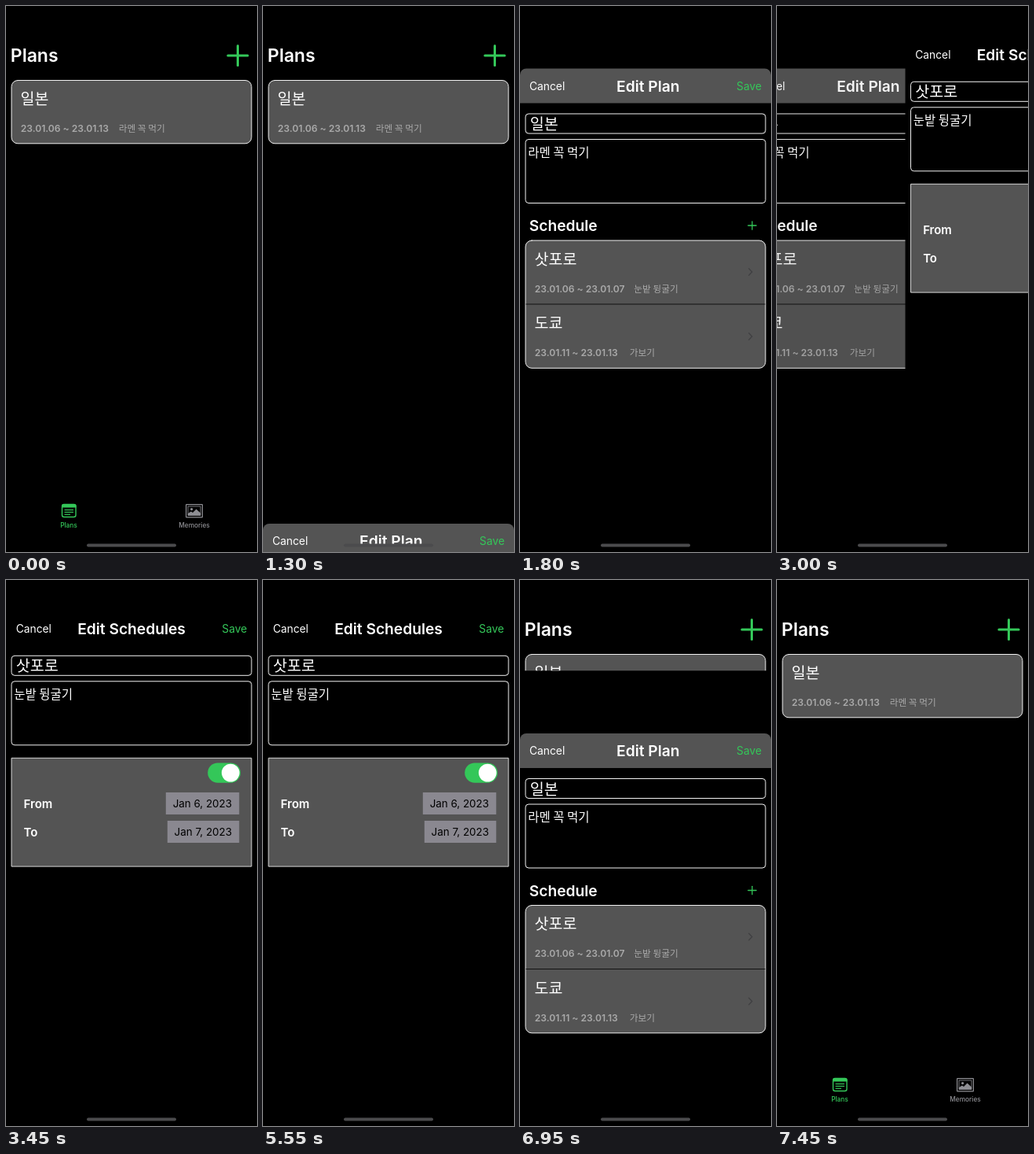
Write an HTML page with a canvas that moves like this. It is 320x694 px and loops after 8000 ms.

```html
<!DOCTYPE html>
<html lang="ko">
<head>
<meta charset="utf-8">
<title>Travel plans</title>
<style>
  html, body { margin: 0; width: 100%; height: 100%; overflow: hidden; background: #000; }
  canvas { display: block; width: 320px; height: 694px; }
</style>
</head>
<body>
<canvas id="stage"></canvas>
<script>
const W = 320, H = 694, LOOP = 8000, STEP = 50;
const GREEN = '#34c759', CARD = '#545454', SOFT = '#a9a9a9', GRAY = '#8e8e93', EDGE = '#f2f2f2';
const LATIN = 'Inter, "Noto Sans CJK KR", sans-serif';
const HANGUL = '"Noto Sans CJK KR", "Noto Sans CJK", sans-serif';

const canvas = document.getElementById('stage');
const ctx = canvas.getContext('2d');
const dpr = window.devicePixelRatio || 1;
canvas.width = W * dpr;
canvas.height = H * dpr;

function text(str, x, y, size, weight = 400, color = '#fff', align = 'left', family = LATIN) {
  ctx.font = `${weight} ${size}px ${family}`;
  ctx.fillStyle = color;
  ctx.textAlign = align;
  ctx.fillText(str, x, y);
}

function hangul(str, x, y, size, color = '#fff') {
  text(str, x, y, size, 500, color, 'left', HANGUL);
}

function box(x, y, w, h, r, fill, stroke, line = 1) {
  ctx.beginPath();
  ctx.roundRect(x, y, w, h, r);
  if (fill) {
    ctx.fillStyle = fill;
    ctx.fill();
  }
  if (stroke) {
    ctx.strokeStyle = stroke;
    ctx.lineWidth = line;
    ctx.stroke();
  }
}

function path(points, color, width, cap = 'butt') {
  ctx.beginPath();
  points.forEach(([x, y], i) => i ? ctx.lineTo(x, y) : ctx.moveTo(x, y));
  ctx.strokeStyle = color;
  ctx.lineWidth = width;
  ctx.lineCap = cap;
  ctx.stroke();
}

function plus(x, y, r, width) {
  path([[x - r, y], [x + r, y]], GREEN, width, 'round');
  path([[x, y - r], [x, y + r]], GREEN, width, 'round');
}

function disc(x, y, r, color) {
  ctx.beginPath();
  ctx.arc(x, y, r, 0, Math.PI * 2);
  ctx.fillStyle = color;
  ctx.fill();
}

function page(x, y, draw) {
  ctx.save();
  ctx.translate(x, y);
  ctx.fillStyle = '#000';
  ctx.fillRect(0, 0, W, H);
  draw();
  ctx.restore();
}

// Title, dates and note of one card row
function entry(y, title, dates, note, noteX) {
  hangul(title, 18.5, y + 31.3, 19.5);
  text(dates, 18.7, y + 66.2, 12.1, 600, SOFT);
  hangul(note, noteX, y + 66.2, 11.7, SOFT);
}

function fields(y, title, note) {
  box(7, y, 306, 25, 4, '#000', EDGE);
  box(7, y + 32.5, 306, 81, 4, '#000', EDGE);
  hangul(title, 12.7, y + 20, 19.6);
  hangul(note, 10.2, y + 54.8, 15.5);
}

function header(title, titleX, y, left, right) {
  text('Cancel', left, y - 2, 13.8);
  text(title, titleX, y, 19.2, 600, '#fff', 'center');
  text('Save', right, y - 2, 13.8, 400, GREEN, 'right');
}

function listIcon() {
  box(71.5, 633.5, 17.5, 16, 2.5, null, GREEN, 1.4);
  box(71, 633, 18.5, 4.5, [2.5, 2.5, 0, 0], GREEN);
  for (const [y, end] of [[640.5, 86], [643.4, 86], [646.3, 82]])
    path([[74.5, y], [end, y]], GREEN, 1.2);
}

function photoIcon() {
  box(229.6, 633.6, 20.8, 16.3, 0.5, null, GRAY, 1.2);
  box(232, 636, 16, 11.5, 0, null, GRAY, 0.8);
  disc(236.6, 639.6, 1.6, GRAY);
  ctx.beginPath();
  [[232, 647.5], [232, 645], [236, 642.5], [238, 644], [242.5, 639.5], [248, 644.5], [248, 647.5]]
    .forEach(([x, y]) => ctx.lineTo(x, y));
  ctx.fill();
}

function plansPage() {
  text('Plans', 5.8, 71.4, 23, 600);
  plus(295.5, 63, 12.6, 3);
  box(7, 94.5, 306, 80.3, 8, CARD, EDGE);
  entry(94, '일본', '23.01.06 ~ 23.01.13', '라멘 꼭 먹기', 143.7);
  listIcon();
  photoIcon();
  text('Plans', 80, 663, 8.3, 500, GREEN, 'center');
  text('Memories', 240, 663, 8.3, 500, GRAY, 'center');
}

function planPage() {
  box(0, 79.5, W, 44, [8, 8, 0, 0], CARD);
  header('Edit Plan', 163.3, 108.8, 12, 308);
  fields(137, '일본', '라멘 꼭 먹기');
  text('Schedule', 11.8, 286, 19.2, 600);
  plus(296, 279, 5.2, 1.3);
  box(7, 298, 306, 162.3, 8, CARD, EDGE);
  path([[7.5, 379], [312.5, 379]], '#111', 1);
  entry(297.5, '삿포로', '23.01.06 ~ 23.01.07', '눈밭 뒹굴기', 145.3);
  entry(379, '도쿄', '23.01.11 ~ 23.01.13', '가보기', 139.7);
  for (const y of [338, 420])
    path([[291.8, y - 4.2], [295.8, y], [291.8, y + 4.2]], '#404042', 1.3, 'round');
}

function dateRow(y, label, date, x) {
  text(label, 22.6, y + 19.6, 15, 600);
  box(x, y, 297.3 - x, 28, 0, '#8a8890');
  text(date, 288, y + 19, 13.4, 400, '#000', 'right');
}

function schedulePage() {
  header('Edit Schedules', 160, 68.8, 12.7, 307.3);
  fields(96.3, '삿포로', '눈밭 뒹굴기');
  box(7, 226.3, 306, 137.8, 0, CARD, '#d8d8d8');
  box(257.2, 232.4, 41.8, 25.4, 12.7, GREEN);
  disc(286.3, 245.1, 11.4, '#fff');
  dateRow(270, 'From', 'Jan 6, 2023', 203.8);
  dateRow(306, 'To', 'Jan 7, 2023', 205.8);
}

// Critically damped spring from 0 to 1
function spring(t, start) {
  const x = Math.max(0, t - start) * 0.01826;
  return x > 9.5 ? 1 : 1 - (1 + x) * Math.exp(-x);
}

function render(t) {
  const cover = spring(t, 1260) - spring(t, 6910);
  const push = spring(t, 2910) - spring(t, 5560);

  ctx.setTransform(dpr, 0, 0, dpr, 0, 0);
  page(0, 0, plansPage);
  if (cover > 0) {
    page(0, H * (1 - cover), () => {
      page(-0.3 * W * push, 0, planPage);
      if (push > 0) {
        ctx.fillStyle = `rgba(0, 0, 0, ${0.1 * push})`;
        ctx.fillRect(0, 0, W, H);
        page(W * (1 - push), 0, schedulePage);
      }
    });
  }
  box(103, 683.5, 114, 4, 2, '#4b4b4d');
}

const begin = performance.now();
function tick() {
  const t = (performance.now() - begin) % LOOP;
  render(Math.floor(t / STEP) * STEP);
  requestAnimationFrame(tick);
}
tick();
</script>
</body>
</html>
```
